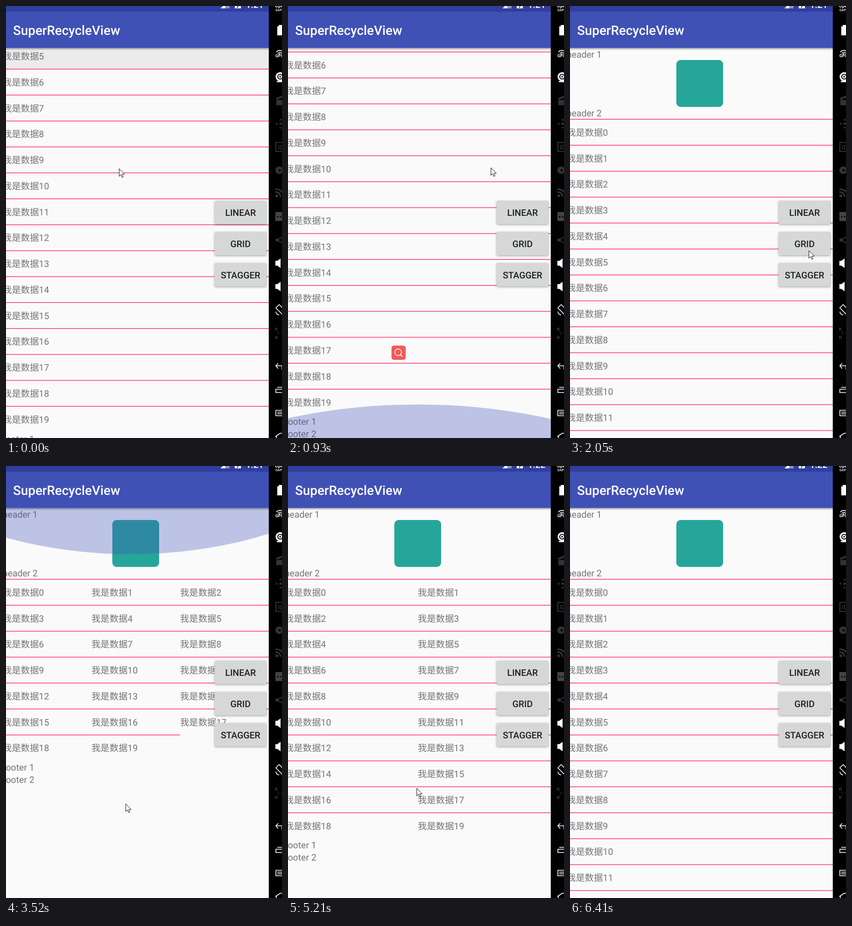
An HTML page with a canvas that plays this animation: 584 px wide and 912 px high, repeating every 6.69 s.

```html
<!DOCTYPE html>
<html lang="zh-CN">
<head>
<meta charset="utf-8">
<style>
  html, body { margin: 0; width: 100%; height: 100%; overflow: hidden; background: #000; }
  canvas { display: block; }
</style>
</head>
<body>
<canvas id="stage" width="584" height="912"></canvas>
<script>
const ctx = document.getElementById('stage').getContext('2d');
ctx.textRendering = 'geometricPrecision';

// Phone layout in density-independent units
const DP = 1.369, LEFT = -7, FULL_W = 563, SCREEN_W = 556;
const ROW = 40 * DP, SMALL = 14 * DP, LARGE = 20 * DP;
const TOP = 88.7, BOTTOM = 915, FIRST_LINE = 239.2, MAX_SCROLL = 470.7;
const ITEMS = 20, LOOP = 6690;
const FONT = 'Roboto, "Noto Sans CJK SC", "Noto Sans CJK", sans-serif';
const DIM = '#333', WHITE = '#fff';

// Pointer stops: arrival time, x, y
const STOPS = [[0, 239, 343], [930, 429, 341], [1340, 238, 716], [2050, 505, 516],
  [3200, 258, 400], [3520, 253, 713], [4100, 505, 580], [4600, 275, 420],
  [4850, 272, 708], [5200, 272, 680], [5740, 505, 450]];

const clamp = v => Math.min(1, Math.max(0, v));
const ease = v => (1 - Math.cos(Math.PI * clamp(v))) / 2;
const mix = (a, b, p) => a + (b - a) * p;
const pulse = (t, peak, depth) => depth * clamp(t < peak ? 1 - (peak - t) / 160 : 1 - (t - peak) / 300);

function pointerAt(t) {
  const next = STOPS.findIndex(s => s[0] > t);
  if (next < 0) return STOPS.at(-1).slice(1);
  const [t0, x0, y0] = STOPS[next - 1], [t1, x1, y1] = STOPS[next];
  const p = ease(1 - (t1 - t) / Math.min(500, t1 - t0));
  return [mix(x0, x1, p), mix(y0, y1, p)];
}

function scrollAt(t) {
  const up = mix(434.5, MAX_SCROLL, ease(t / 350));
  return up * (1 - ease((t - 1070) / 260));
}

function text(str, x, y, size, color, weight = 400, align = 'left') {
  ctx.font = `${weight} ${size}px ${FONT}`;
  ctx.fillStyle = color;
  ctx.textAlign = align;
  ctx.fillText(str, x, y);
}

function rect(x, y, w, h, color) {
  ctx.fillStyle = color;
  ctx.fillRect(x, y, w, h);
}

function rounded(x, y, w, h, r, color) {
  ctx.fillStyle = color;
  ctx.beginPath();
  ctx.roundRect(x, y, w, h, r);
  ctx.fill();
}

function disc(x, y, r, color) {
  ctx.fillStyle = color;
  ctx.beginPath();
  ctx.arc(x, y, r, 0, 7);
  ctx.fill();
}

function stroke(path, color, width = 1.6) {
  ctx.strokeStyle = color;
  ctx.lineWidth = width;
  ctx.stroke(new Path2D(path));
}

function fill(path, color) {
  ctx.fillStyle = color;
  ctx.fill(new Path2D(path));
}

function at(x, y, paint) {
  ctx.save();
  ctx.translate(x, y);
  paint();
  ctx.restore();
}

const label = (str, x, y) => text(str, x, y, SMALL, '#747474');

function drawList(columns, pressed) {
  const colW = FULL_W / columns, last = Math.ceil(ITEMS / columns) - 1;
  label('header 1', LEFT, 109);
  label('header 2', LEFT, 233);
  rounded(225, 114, 99, 99, 9, '#26a69a');
  for (let i = 0; i < ITEMS; i++) {
    const y = FIRST_LINE + Math.floor(i / columns) * ROW;
    if (i === pressed) rect(0, y, SCREEN_W, ROW, '#ebebeb');
    label('我是数据' + i, LEFT + (i % columns) * colW, y + 34.6);
  }
  for (let r = 0; r <= last; r++) {
    const cells = Math.min(columns, ITEMS - r * columns);
    rect(LEFT, FIRST_LINE + r * ROW - 0.8, cells * colW, 1.6, '#ff4081');
  }
  const end = FIRST_LINE + last * ROW;
  label('footer 1', LEFT, end + 75.4);
  label('footer 2', LEFT, end + 101.2);
}

// A wide circle squashed in proportion to its depth
function drawGlow(depth, edge, dir, cx) {
  if (depth < 1) return;
  const r = FULL_W * 1.2, ry = r * depth / 149;
  ctx.fillStyle = 'rgba(63,81,181,.325)';
  ctx.beginPath();
  ctx.ellipse(cx, edge + dir * (depth - ry), r, ry, 0, 0, 7);
  ctx.fill();
}

function drawButton(str, index) {
  const y = 411 + index * 48 * DP;
  ctx.save();
  ctx.shadowColor = 'rgba(0,0,0,.35)';
  ctx.shadowBlur = 4;
  ctx.shadowOffsetY = 1.5;
  rounded(441.5, y, 80 * DP, 36 * DP, 2 * DP, '#d6d7d7');
  ctx.restore();
  text(str, 441.5 + 40 * DP, y + 32.2, SMALL, '#202020', 500, 'center');
}

function drawBars(clock) {
  const shade = ctx.createLinearGradient(0, TOP, 0, TOP + 5);
  shade.addColorStop(0, 'rgba(0,0,0,.32)');
  shade.addColorStop(1, 'rgba(0,0,0,0)');
  rect(0, TOP, SCREEN_W, 5, shade);
  rect(0, 0, SCREEN_W, 12, '#303f9f');
  rect(0, 12, SCREEN_W, TOP - 12, '#3f51b5');
  text('SuperRecycleView', 15, 60.5, LARGE, WHITE, 500);
  text(clock, 545, 3.5, SMALL, WHITE, 500, 'right');
  fill('M454 5L473 -14V5Z', '#8d95cb');
  fill('M454 5L464 -5V5Z', WHITE);
  rect(484, 0, 13, 5, WHITE);
  stroke('M492 -1L489 4', '#303f9f', 2);
}

const speaker = () => fill('M0 -5H4L11 -10V10L4 5H0Z', WHITE);

// Each tool is painted around the middle of its left edge
const tools = [
  () => { text('Open', -1, 0, 10, WHITE, 700); text('GAPPS', 0, 8, 7, WHITE, 500); },
  () => fill('M4 -9H7V-12H20V10H4Z', WHITE),
  () => {
    stroke('M2 -4Q9 -11 17 -4M5 -1Q9 -6 14 -1', WHITE);
    disc(9, 0, 1.5, WHITE);
    text('GPS', 0, 7, 8.5, WHITE, 700);
  },
  () => {
    [9.5, 6, 4, 1.7].forEach((r, i) => disc(10, -1, r, i % 2 ? '#000' : WHITE));
    rect(3, 8, 14, 2.5, WHITE);
  },
  () => { rect(2, -1, 14, 11, DIM); stroke('M2 -3L14 -8', DIM, 4); },
  () => {
    fill('M0 0L4 -3V3ZM8 -7L11 -11L14 -7ZM8 7L11 11L14 7Z', DIM);
    disc(11, 0, 2.5, DIM);
  },
  () => { ctx.strokeStyle = DIM; ctx.lineWidth = 2; ctx.strokeRect(1, -9.5, 20, 19); text('ID', 5, 5, 13, DIM, 500); },
  () => { disc(8, 0, 8, DIM); disc(9, 0, 2.5, '#000'); },
  () => { disc(3, 5, 3, DIM); stroke('M0 -3Q10 -3 11 7M0 -9Q16 -9 18 7', DIM, 3); },
  () => { rect(0, -10, 14, 19, '#444'); disc(5, 0, 1.7, '#000'); disc(11, 0, 1.7, '#000'); },
  () => { disc(3.5, 0, 3.5, DIM); stroke('M16 -7L3 0L16 7', DIM, 2); },
  speaker,
  speaker,
  () => stroke('M1 -4L8 -11L22 3L15 10ZM1 4Q2 10 8 11', WHITE),
  () => { stroke('M5 -10H0V-5M0 -10L5 -5M5 11H0V6M0 11L5 6', DIM); text('1:1', 4, 4, 9, DIM, 500); },
];

const navigation = [
  'M6 -6L1 -1L6 5M1 -1H14V7',
  'M20 -1H1V6H20M4 -5H20',
  'M20 -6H1V5.5H20M4 -2H20M4 1.5H20',
  'M0 0L10 -7H20M2 -1V5',
];

function drawSidebar() {
  rect(SCREEN_W, 0, 28, 912, '#000');
  tools.forEach((paint, i) => at(570, 3 + i * 49.1, paint));
  navigation.forEach((path, i) => at(570, 760.5 + i * 49.5, () => stroke(path, WHITE)));
}

function drawSearchBadge() {
  rounded(219, 717, 30, 30, 5, '#f35b56');
  ctx.strokeStyle = WHITE;
  ctx.lineWidth = 1.6;
  ctx.beginPath();
  ctx.arc(233, 731, 7, 0, 7);
  ctx.stroke();
  stroke('M238 736L242 740', WHITE, 1.8);
}

function drawPointer([x, y]) {
  const arrow = 'M0 0V16L3.7 12.5L6.2 18.3L8.6 17.2L6.2 11.6H11.3Z';
  at(Math.round(x) + 0.5, Math.round(y) + 0.5, () => {
    fill(arrow, WHITE);
    stroke(arrow, '#111', 1);
  });
}

function draw(t) {
  const columns = t < 2580 ? 1 : t < 4180 ? 3 : t < 5850 ? 2 : 1;
  const topGlow = pulse(t, 1440, 40) + pulse(t, 3520, 98) + pulse(t, 4850, 80);
  ctx.save();
  ctx.beginPath();
  ctx.rect(0, 0, SCREEN_W, 912);
  ctx.clip();
  rect(0, 0, SCREEN_W, 912, '#fafafa');
  at(0, -scrollAt(t), () => drawList(columns, t < 120 ? 5 : -1));
  drawGlow(topGlow, TOP, 1, columns === 1 ? 274.5 : 264);
  drawGlow(pulse(t, 930, 74), BOTTOM, -1, 274.5);
  drawBars(t < 3900 ? '1:21' : '1:22');
  ['LINEAR', 'GRID', 'STAGGER'].forEach(drawButton);
  if (t > 780 && t < 1100) drawSearchBadge();
  if (t < 6100) drawPointer(pointerAt(t));
  ctx.restore();
  drawSidebar();
}

const start = performance.now();
function tick() {
  draw((performance.now() - start) % LOOP);
  requestAnimationFrame(tick);
}
tick();
</script>
</body>
</html>
```
